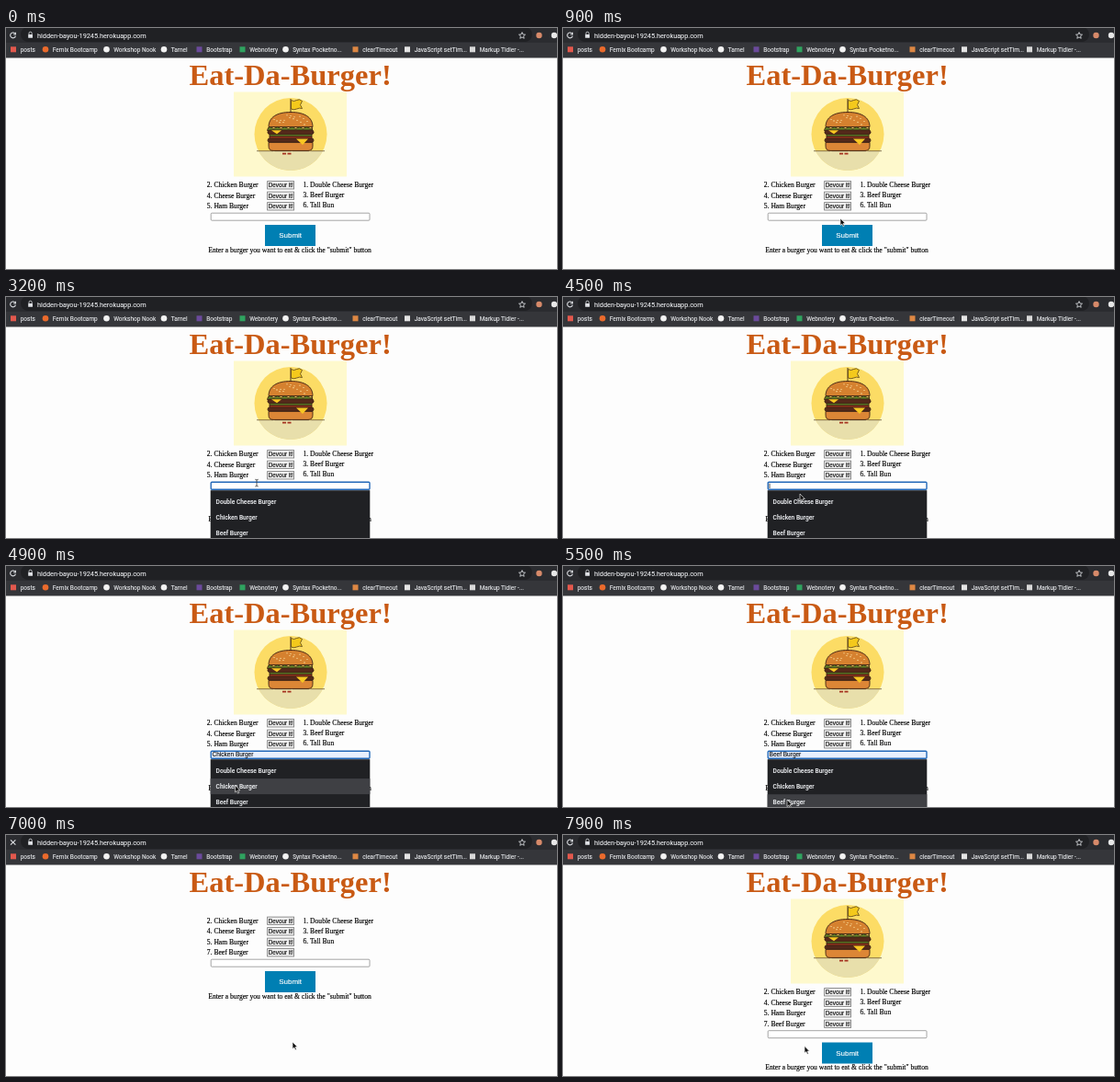
An HTML page that plays this animation: 600x262 px, repeating every 8 s.

```html
<!DOCTYPE html>
<html lang="en">
<head>
<meta charset="utf-8">
<title>Eat-Da-Burger!</title>
<style>
  html, body { margin: 0; width: 100%; height: 100%; overflow: hidden; background: #fdfdfd; }
  svg { display: block; width: 100%; height: 100%; }
  .ui { font-family: Roboto, "Liberation Sans", sans-serif; fill: #eceef1; stroke: #eceef1; stroke-width: .1; }
  .serif { font: 7.6px "Liberation Serif", serif; stroke: #000; stroke-width: .15; }
  .sans { font-family: "Liberation Sans", sans-serif; stroke: #000; stroke-width: .1; }
  .sans.light { fill: #fff; stroke: #fff; stroke-width: .15; }
</style>
</head>
<body>
<svg viewBox="0 0 600 262">
  <rect width="600" height="262" fill="#fdfdfd"/>

  <g id="page">
    <text x="199.5" y="61.6" font-family="'Liberation Serif', serif" font-weight="700" font-size="32.5" fill="#c95a14">Eat-Da-Burger!</text>

    <g id="picture">
      <rect x="248" y="69.5" width="123" height="92" fill="#fef9cd"/>
      <circle cx="310" cy="115.5" r="39.5" fill="#fcdc65"/>
      <path d="M275 133.7A39.5 39.5 0 0 0 345 133.7Z" fill="#e8dfab"/>
      <path d="M273 133.7H347" stroke="#6b5636" stroke-width=".8" stroke-dasharray="18 1.5"/>
      <path d="M310 77V93" stroke="#4a321c" stroke-width="1"/>
      <path d="M310.5 78.5q3 2 6 0t6 1l-2 4 2 4q-3-1-6 .5t-6 0Z" fill="#f4c91c" stroke="#5a4216" stroke-width=".8"/>
      <g stroke="#3c2014" stroke-width=".9" stroke-linejoin="round">
        <path d="M286 107.5C286 97 295 91.5 310 91.5S334 97 334 107.5Z" fill="#d5812f"/>
        <path d="M285.5 108.5q2-2 4 0t4 0 4 0 4 0 4 0 4 0 4 0 4 0 4 0 4 0 4 0 4 0v3h-49Z" fill="#5f7f26"/>
        <rect x="285" y="111" width="50" height="4.6" rx="2.3" fill="#54291a"/>
        <path d="M287 115.6h46v2.4h-46Z" fill="#5f7f26"/>
        <path d="M287 118h46v2.2h-46Z" fill="#c13a22"/>
        <rect x="285" y="120" width="50" height="4.2" rx="2.1" fill="#54291a"/>
        <path d="M286 124.4h48v4q0 5-5 5h-38q-5 0-5-5Z" fill="#dc8636"/>
      </g>
      <path d="M289 111.3h11l-5 4ZM316 120.5h13l-6 6.5Z" fill="#f8c722"/>
      <g id="seeds" fill="#f9dc9c"/>
      <path d="M301 136.7h4m1.5 0h4" stroke="#a53220" stroke-width="1.8"/>
    </g>

    <g id="lists"></g>
    <g id="form">
      <rect id="field" x="223.2" y="201.2" width="172.8" height="8" rx="1"/>
      <text id="value" class="sans" x="224.6" y="207.4" font-size="6.5"></text>
      <path id="caret" d="M225 202.6V208" stroke="#000" stroke-width=".7"/>
      <rect id="submit" x="282" y="214" width="55" height="23"/>
      <text class="sans light" x="297.2" y="228.2" font-size="8">Submit</text>
      <text class="serif" x="220.3" y="243.7">Enter a burger you want to eat &amp; click the "submit" button</text>
    </g>
  </g>

  <g id="menu">
    <rect x="222.7" y="210.2" width="173.6" height="56" fill="#202124"/>
    <rect id="highlight" x="222.7" width="173.6" height="17" fill="#3f4044"/>
    <g id="options" class="ui" font-size="6.6" font-weight="500"></g>
  </g>

  <g id="toolbar">
    <rect width="600" height="32.5" fill="#35363a"/>
    <rect width="600" height="16" fill="#2b2c30"/>
    <rect x="16" y="-1" width="557" height="16" rx="8" fill="#202124"/>
    <g fill="none" stroke="#dfe1e5" stroke-width="1.1">
      <path id="reload" d="M9.7 6A2.9 2.9 0 1 0 10.4 8.6M10.4 4.8V7H8.2"/>
      <path id="stop" d="M5 5.3 10.4 10.7M10.4 5.3 5 10.7"/>
      <path d="M25 7.3V5.8a1.6 1.6 0 0 1 3.2 0V7.3" stroke-width=".8"/>
      <path d="M562 4.6 563 7 565.5 7.2 563.6 8.8 564.2 11.3 562 10 559.8 11.3 560.4 8.8 558.5 7.2 561 7Z" stroke-width=".8"/>
    </g>
    <rect x="24.2" y="7" width="4.8" height="3.8" rx=".5" fill="#dfe1e5"/>
    <circle cx="580.5" cy="8" r="3.2" fill="#d78a6a"/>
    <circle cx="597" cy="8" r="3.2" fill="#e8e8e8"/>
    <text class="ui" x="34" y="10.6" font-size="7.3">hidden-bayou-19245.herokuapp.com</text>
    <g id="bookmarks" class="ui" font-size="6.5"></g>
  </g>

  <g id="pointer">
    <path id="arrow" d="M0 0V7.6L1.8 6 3 8.8 4.3 8.2 3.1 5.5H5.4Z" fill="#111" stroke="#fff" stroke-width=".6"/>
    <path id="beam" d="M-1.7-3.7Q0-3.7 0-2.5V2.8Q0 4-1.7 4M1.7-3.7Q0-3.7 0-2.5M0 2.8Q0 4 1.7 4" fill="none" stroke="#333" stroke-width=".8"/>
    <path id="hand" d="M-.8 0q.8-1 1.6 0V3.2l3 .8q.8.4.5 1.6L3.6 8.4H-.4L-2.6 5.2q.2-1 1.8.2Z" fill="#fff" stroke="#111" stroke-width=".7"/>
  </g>
</svg>

<script>
const $ = id => document.getElementById(id);
const show = (id, on) => $(id).setAttribute('display', on ? 'inline' : 'none');
const put = (id, x, y) => $(id).setAttribute('transform', `translate(${x} ${y})`);
const label = (x, y, text, cls = '') => `<text x="${x}" y="${y}" class="${cls}">${text}</text>`;

const LOOP = 8000;
const ROW = 11.5;
const PICTURE_HEIGHT = 77.5;
const OPTIONS = ['Double Cheese Burger', 'Chicken Burger', 'Beef Burger'];
const WAITING = ['2. Chicken Burger', '4. Cheese Burger', '5. Ham Burger', '7. Beef Burger'];
const EATEN = ['1. Double Cheese Burger', '3. Beef Burger', '6. Tall Bun'];

// [icon x, colour, shape, text]
const BOOKMARKS = [
  [8, '#e2584d', 'square', 'posts'],
  [43, '#ea6a2c', 'circle', 'Fernix Bootcamp'],
  [109.5, '#f2f2f2', 'circle', 'Workshop Nook'],
  [172, '#f2f2f2', 'circle', 'Tarnel'],
  [210.5, '#6b4a9c', 'square', 'Bootstrap'],
  [257.5, '#2fa35f', 'square', 'Webnotery'],
  [304.5, '#f2f2f2', 'circle', 'Syntax Pocketno...'],
  [380.5, '#dd8743', 'square', 'clearTimeout'],
  [437, '#e4e4e4', 'square', 'JavaScript setTim...'],
  [508, '#d8d8d8', 'square', 'Markup Tidier -...']
];

// [time, x, y]
const PATH = [
  [100, 402, 188], [900, 302, 207], [1400, 273, 202], [4300, 273, 202],
  [4500, 258, 214], [5200, 244, 254], [5700, 244, 254],
  [6400, 312, 225], [7700, 312, 225], [7900, 263, 229.5]
];

function build() {
  $('bookmarks').innerHTML = BOOKMARKS.map(([x, color, shape, text]) => {
    const icon = shape === 'circle'
      ? `<circle cx="${x}" cy="23.3" r="3.3" fill="${color}" stroke="none"/>`
      : `<rect x="${x - 3}" y="20.3" width="6" height="6" fill="${color}" stroke="none"/>`;
    return icon + label(x + 7.7, 25.6, text);
  }).join('');

  $('lists').innerHTML = WAITING.map((text, i) => `
    <g id="row${i}" transform="translate(0 ${i * ROW})">
      ${label(218.8, 173, text, 'serif')}
      <rect x="284.6" y="166.6" width="29" height="8.4" fill="#efefef" stroke="#777" stroke-width=".8"/>
      <text x="285.7" y="173.1" class="sans" font-size="6.3">Devour it!</text>
    </g>`).join('') + EATEN.map((text, i) => label(323.5, 173 + i * 11, text, 'serif')).join('');

  $('options').innerHTML = OPTIONS.map((text, i) => label(228.6, 225.1 + i * 17.1, text)).join('');

  $('seeds').innerHTML = Array.from({ length: 17 }, (_, i) => {
    const x = 292 + (i * 11) % 37;
    const top = 94.5 + ((x - 310) / 18) ** 2 * 5;
    return `<ellipse cx="${x}" cy="${top + (i * 5) % 8}" rx=".8" ry=".6"/>`;
  }).join('');
}

function pointerAt(t) {
  const next = PATH.findIndex(p => p[0] > t);
  if (next < 0) return PATH[PATH.length - 1].slice(1);
  if (next === 0) return PATH[0].slice(1);
  const [a, b] = [PATH[next - 1], PATH[next]];
  const u = (t - a[0]) / (b[0] - a[0]);
  const k = u * u * (3 - 2 * u);
  return [a[1] + (b[1] - a[1]) * k, a[2] + (b[2] - a[2]) * k];
}

function render(t) {
  const [x, y] = pointerAt(t);
  const added = t >= 6800;
  const loading = t >= 6700 && t < 7150;
  const pictureMissing = added && loading;
  const focused = t >= 1450 && t < 6600;
  const open = t >= 1700 && t < 5700;
  const hovered = open && y >= 215 ? Math.min(2, Math.floor((y - 214) / 17)) : -1;
  const value = t >= 5700 && !added ? OPTIONS[2] : OPTIONS[hovered] || '';

  const shift = pictureMissing ? -PICTURE_HEIGHT : 0;
  show('picture', !pictureMissing);
  show('row3', added);
  put('lists', 0, shift);
  put('form', 0, shift + (added ? ROW : 0));
  show('stop', loading);
  show('reload', !loading);

  const field = $('field');
  field.setAttribute('fill', value ? '#e8f0fe' : '#fff');
  field.setAttribute('stroke', focused ? '#2268b8' : '#8e8e8e');
  field.setAttribute('stroke-width', focused ? 1.4 : .8);
  $('value').textContent = value;
  show('caret', focused && !value && t % 1000 >= 500);

  show('menu', open);
  show('highlight', hovered >= 0);
  $('highlight').setAttribute('y', 214 + hovered * 17.1);

  const onSubmit = t >= 6250 && t < 6800 || t >= 7150 && t < 7800;
  const onField = t >= 1000 && t < 4400;
  $('submit').setAttribute('fill', onSubmit ? '#0077a8' : '#007fb3');
  show('pointer', t >= 100);
  put('pointer', x, y);
  show('beam', onField);
  show('hand', onSubmit);
  show('arrow', !onField && !onSubmit);
}

build();
const start = performance.now();
function tick() {
  render((performance.now() - start) % LOOP);
  requestAnimationFrame(tick);
}
tick();
</script>
</body>
</html>
```
